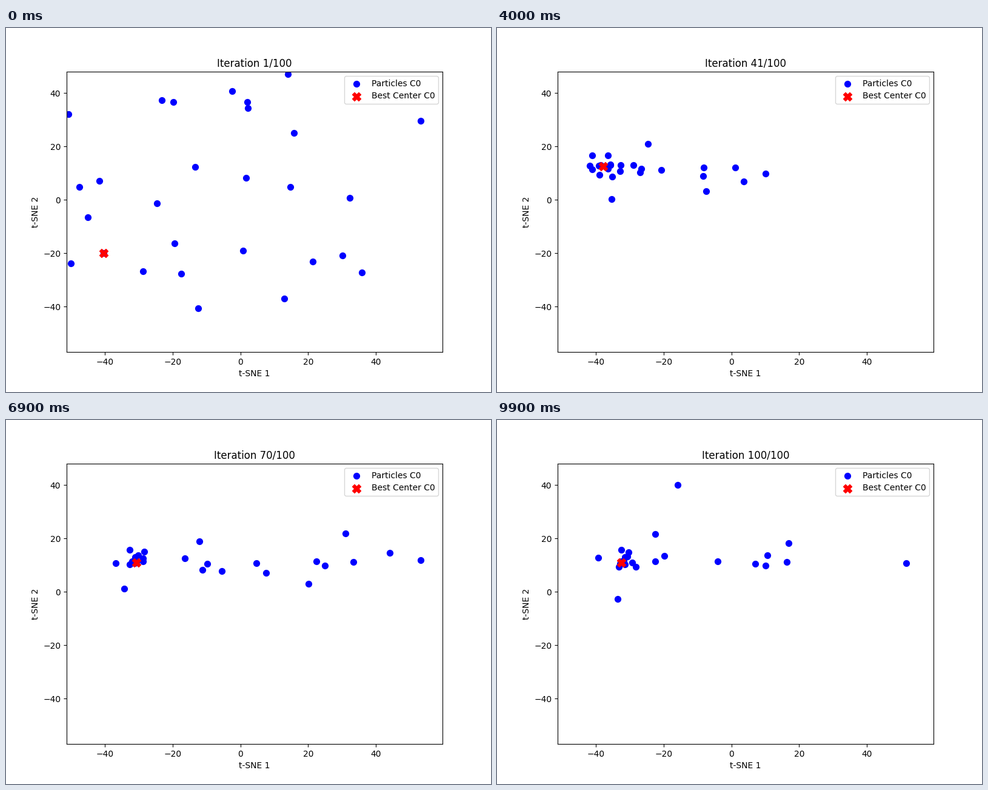
These frames come from a looping animation (800 by 600 pixels, 10 s). A matplotlib script:

```python
import numpy as np
import matplotlib.pyplot as plt
from matplotlib.animation import FuncAnimation

FRAMES, INTERVAL = 100, 100
COUNT, SETTLED = 28, 11
INERTIA, PULL = 0.65, 1.3
LOW, HIGH = np.array([-51.3, -56.95]), np.array([59.64, 48.05])
HOME = np.array([-31, 11])

# Iteration at which the best center jumps to a new place
BEST = {
    0: (-40.3, -20.0), 5: (-26.1, 11.4), 20: (-32.0, 10.9),
    35: (-37.9, 12.5), 45: (-30.8, 10.9), 92: (-32.5, 11.0),
}


def best_at(step):
    return np.array(BEST[max(k for k in BEST if k <= step)])


def personal_bests(rng):
    """Part of the swarm settles at home, the rest along a wide band."""
    home = rng.normal(HOME, (3, 2), (SETTLED, 2))
    band = np.column_stack([rng.uniform(-30, 60, COUNT - SETTLED),
                            rng.laplace(HOME[1], 9, COUNT - SETTLED)])
    return np.vstack([home, band])


def simulate(seed):
    rng = np.random.default_rng(seed)
    start = rng.uniform(LOW + (0, 16), HIGH - (6, 0), (COUNT, 2))
    start[0] = best_at(0)
    found = personal_bests(rng)
    found_at = rng.integers(4, 24, COUNT)
    pos, vel = start, np.zeros((COUNT, 2))
    path = [pos]
    for step in range(1, FRAMES):
        own = np.where((step >= found_at)[:, None], found, start)
        r1, r2 = rng.random((2, COUNT, 2))
        vel = (INERTIA * vel + PULL * r1 * (own - pos)
               + PULL * r2 * (best_at(step) - pos))
        pos = pos + vel
        path.append(pos)
    return path


swarm = simulate(seed=7)

fig, ax = plt.subplots(figsize=(8, 6), dpi=100)
particles = ax.scatter(*swarm[0].T, c="blue", s=50, label="Particles C0")
center = ax.scatter(*BEST[0], c="red", s=100, marker="X",
                    label="Best Center C0")
ax.set_xlim(LOW[0], HIGH[0])
ax.set_ylim(LOW[1], HIGH[1])
ax.set_xlabel("t-SNE 1")
ax.set_ylabel("t-SNE 2")
ax.legend(loc="upper right")
title = ax.set_title("")


def update(step):
    particles.set_offsets(swarm[step])
    center.set_offsets([best_at(step)])
    title.set_text(f"Iteration {step + 1}/{FRAMES}")
    return particles, center, title


anim = FuncAnimation(fig, update, frames=FRAMES, interval=INTERVAL,
                     repeat=True, repeat_delay=0)
plt.show()
```
